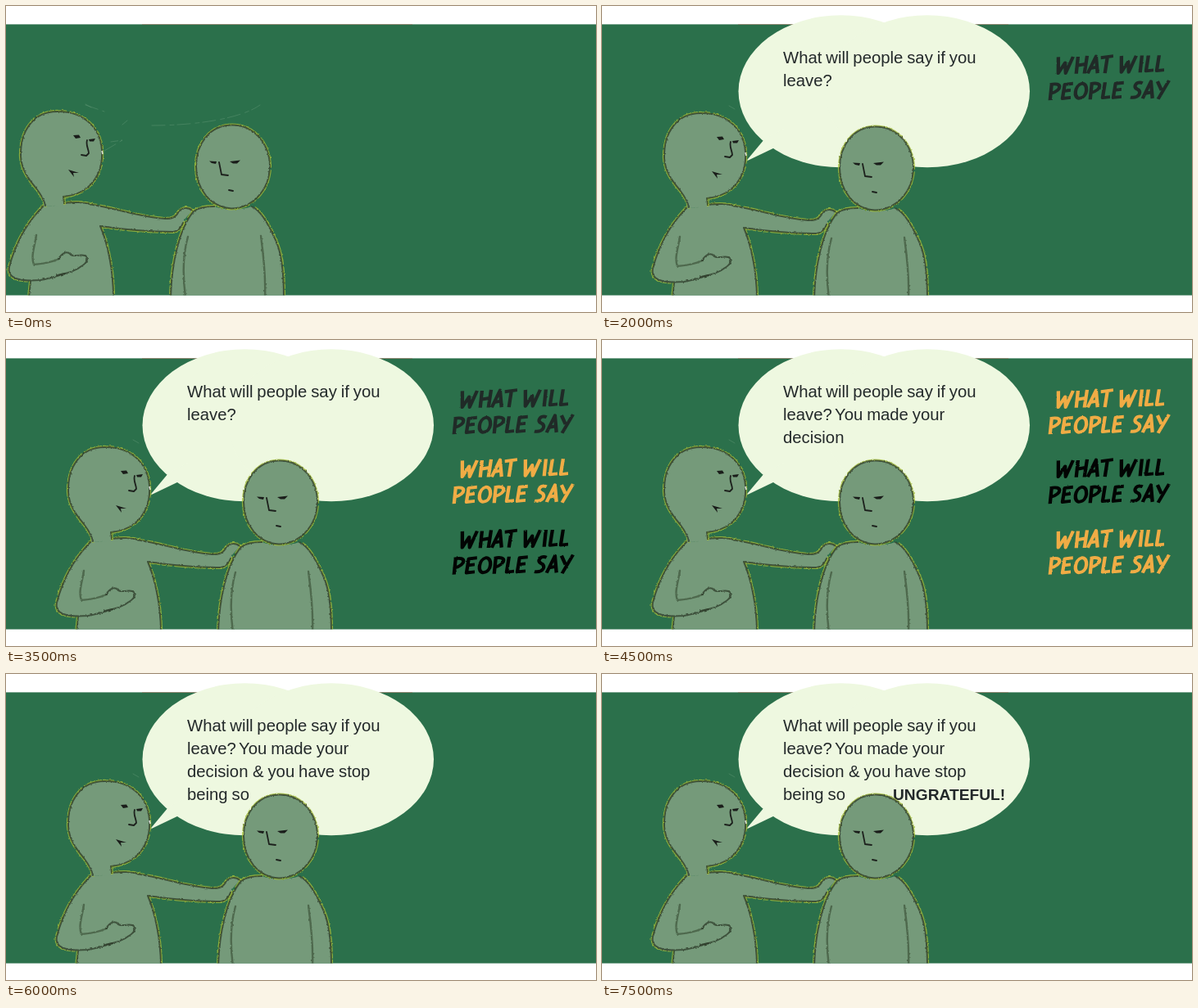
An HTML page for the animation above (8000 ms loop, 720 by 374 pixels).

```html
<!DOCTYPE html>
<html lang="en">
<head>
<meta charset="utf-8">
<title>What will people say</title>
<style>
  html, body { margin: 0; width: 100%; height: 100%; overflow: hidden; background: #fff; }
  svg { display: block; width: 720px; height: 374px; }
  .speech { font: 20.3px "Liberation Sans", Arial, sans-serif; word-spacing: -.7px; fill: #23292a; }
  .loud { font-size: 19.2px; font-weight: bold; }
  .skin { fill: #759a7a; }
  .ink, .glow, .soft, .scratch, .brush { fill: none; stroke-linecap: round; stroke-linejoin: round; }
  .glow { stroke: #a3bd3c; stroke-width: 4.2; stroke-dasharray: 9 2 4 3 14 1 3 5; opacity: .8; }
  .ink { stroke: #2d3a29; stroke-width: 2; opacity: .75; }
  .soft { stroke: #42583f; stroke-width: 2.4; opacity: .75; }
  .face { fill: none; stroke: #1d211d; stroke-width: 1.8; stroke-linecap: round; stroke-linejoin: round; }
  .lid { fill: #1a1d1a; }
  .scratch { stroke: #5c9472; stroke-width: .7; stroke-dasharray: 16 6 5 4; opacity: .75; }
  .brush { stroke-width: 4.3; stroke-linecap: butt; }
</style>
</head>
<body>
<svg viewBox="0 0 720 374">
  <defs>
    <filter id="rough" filterUnits="userSpaceOnUse" x="-20" y="0" width="760" height="374" color-interpolation-filters="sRGB">
      <feTurbulence type="fractalNoise" baseFrequency=".35" numOctaves="2" seed="4"/>
      <feDisplacementMap in="SourceGraphic" scale="2.6" xChannelSelector="R" yChannelSelector="G"/>
    </filter>
    <filter id="dry" filterUnits="userSpaceOnUse" x="500" y="30" width="220" height="280" color-interpolation-filters="sRGB">
      <feTurbulence type="fractalNoise" baseFrequency=".25" numOctaves="2" seed="9"/>
      <feDisplacementMap in="SourceGraphic" scale="1.8" xChannelSelector="R" yChannelSelector="G"/>
    </filter>
    <clipPath id="band"><rect width="720" height="353.6"/></clipPath>
  </defs>

  <rect y="22.4" width="720" height="331.2" fill="#2b704b"/>
  <path d="M166 22.6H496" stroke="#a8563f" stroke-width=".7" opacity=".6"/>

  <g id="bubble" fill="#eef8e0">
    <ellipse cx="291.500" cy="104.300" rx="125" ry="93"/>
    <ellipse cx="397" cy="104.300" rx="125" ry="93"/>
    <path d="M198 163L175.500 190L211 173L222 150Z"/>
  </g>
  <g id="speech"></g>

  <g clip-path="url(#band)">
    <g id="people">
      <path class="scratch" d="M155 122L162 126"/>
      <g id="scratches">
        <path class="scratch" d="M155 123L178 131M206 142L200 147M236 148C288 148 344 140 368 123M178 179L200 166L186 168"/>
      </g>
      <g id="figures"></g>
      <g filter="url(#rough)">
        <path class="soft" d="M95 282C93 296 88 308 92 318C104 317 114 315 123 311M280 284C273 308 274 335 277 358M369 283C372 305 375 335 374 358"/>
        <path class="ink" d="M122 311C127 303 133 301 137 306C143 309 149 305 154 307C160 309 157 316 150 320C143 326 132 329 120 331"/>
      </g>
      <path class="lid" d="M140 160L147 159.500L149 163L143 164ZM159 165L167 164L165 167.500L160 167.500ZM306 191.500L315 192L314 195L309 194ZM331 192L344 190.500L340 194.500L335 194.500ZM134 202L147 206L140 206L141 211Z"/>
      <path class="face" d="M157 166C155 172 159 177 159 182L156 185L150 184M318 193L321 208L329 209"/>
      <path class="face" stroke-linecap="butt" d="M330 227L335 228"/>
      <path d="M175 179L176 183" stroke="#dfe6dc" stroke-width="1.500"/>
    </g>
  </g>
  <g id="titles" filter="url(#dry)"></g>
</svg>

<script>
const STEP = 500, STEPS = 16;
const $ = id => document.getElementById(id);

function add(parent, tag, attrs = {}) {
  const el = document.createElementNS("http://www.w3.org/2000/svg", tag);
  for (const key in attrs) el.setAttribute(key, attrs[key]);
  return parent.appendChild(el);
}

// Closed shapes; the lower edges run past the band and are clipped.
const shapes = {
  leftBody: "M104 246C88 262 71 286 62 321C59 335 74 339 88 338L86 358H189" +
    "C189 325 182 292 173 271C200 275 232 278 262 278C268 277 272 273 274 267" +
    "C275 262 281 258 285 252C281 248 273 248 269 253C265 261 260 262 252 262" +
    "C222 260 190 249 164 245C152 241 140 242 129 243C120 247 112 247 104 246Z",
  leftHead: "M104 247C105 240 101 233 95 225C85 213 77 202 76 186C75 153 93 130 122 131" +
    "C153 131 173 151 175 178C177 207 161 232 128 235L128 246Z",
  rightBody: "M312 247C300 247 292 249 287 253C269 274 260 318 259 358H397" +
    "C397 328 395 303 386 286C378 268 369 252 358 247C344 252 326 252 312 247Z",
  rightHead: "M333 147.500C360 147 380 170 380 199C379 228 358 249 333 249.500" +
    "C307 248 290 225 290 198C290 170 307 148 333 147.500Z"
};
// Drawn edges, left open where the neck and arms join.
const outlines = {
  leftBody: "M104 246C88 262 71 286 62 321C59 335 74 339 100 337C112 335 120 332 130 329" +
    "M88 339L86 358M189 358C189 325 182 292 173 271C200 275 232 278 262 278" +
    "C268 277 272 273 274 267M285 252C281 248 273 248 269 253C265 261 260 262 252 262" +
    "C222 260 190 249 164 245C152 241 140 242 129 243",
  leftHead: "M106 246C105 240 101 233 95 225C85 213 77 202 76 186C75 153 93 130 122 131" +
    "C153 131 173 151 175 178C177 207 161 232 128 235L129 243",
  rightBody: "M312 247C300 247 292 249 287 253C269 274 260 318 259 358" +
    "M397 358C397 328 395 303 386 286C378 268 369 252 358 247",
  rightHead: shapes.rightHead
};
for (const name in shapes) {
  const rough = add($("figures"), "g", { filter: "url(#rough)" });
  add(rough, "path", { class: "glow", d: outlines[name] });
  add(rough, "path", { class: "skin", d: shapes[name] });
  add(rough, "path", { class: "ink", d: outlines[name] });
}

// Text, x, baseline, first step, extra class.
const phrases = [
  ["What will people say if you", 221, 70, 2],
  ["leave?", 221, 98, 3],
  ["You made your", 284, 98, 8],
  ["decision", 221, 126, 9],
  ["& you have", 301, 126, 10],
  ["stop", 406, 126, 11],
  ["being so", 221, 154, 12],
  ["UNGRATEFUL!", 355, 154, 13, "loud"]
].map(([words, x, y, from, extra = ""]) => {
  const el = add($("speech"), "text", { x, y, class: "speech " + extra });
  el.textContent = words;
  return { el, from };
});

// Brush capitals, 24 high: advance and strokes.
const glyphs = {
  W: [24, "M2 1L4 23L11 9L13 23L20 1"],
  H: [16, "M2 1L2 24M13 0L12 24M2 13L13 11"],
  A: [14, "M0 24L8 1L12 24M3 17L12 15"],
  T: [15, "M0 3L15 1M8 2L7 24"],
  I: [8, "M3 1L3 24"],
  L: [13, "M3 1L2 22L11 21"],
  P: [16, "M3 1L3 24M1 3C16 -1 17 11 3 15"],
  E: [15, "M13 2L3 3L2 22L12 21M2 12L11 11"],
  O: [18, "M9 2C0 4 0 23 8 22C18 21 17 2 9 2Z"],
  S: [15, "M13 3C5 0 1 8 7 11C14 14 11 24 0 22"],
  Y: [15, "M2 1L8 13M16 0L5 25"],
  " ": [8, ""]
};

function letter(parent, words, x, y) {
  const line = add(parent, "g", {
    class: "brush", role: "img", "aria-label": words,
    transform: `translate(${x} ${y}) rotate(-1) skewX(-7) scale(1 .9)`
  });
  let pen = 0;
  for (const char of words) {
    const [advance, d] = glyphs[char];
    add(line, "path", { d, transform: `translate(${pen} 0)` });
    pen += advance;
  }
  return line;
}

const titles = [0, 85, 171.5].map(dy => {
  const el = add($("titles"), "g");
  letter(el, "WHAT WILL", 555, 61.5 + dy);
  const second = letter(el, "PEOPLE SAY", 546, 93.5 + dy);
  return { el, second };
});

const paint = { d: "#202a27", o: "#f0ac45", k: "#020403" };
// Colours of the three titles, by step.
const looks = ["", "", "", "d", "d", "do", "doo", "dok", "oko", "oko"];

function show(el, on) {
  el.style.display = on ? "" : "none";
}

function draw(step) {
  $("people").setAttribute("transform", step ? "" : "translate(-58 -2)");
  show($("scratches"), step === 0);
  show($("bubble"), step > 0);
  phrases.forEach(({ el, from }) => show(el, step >= from));
  const look = looks[step] || "";
  titles.forEach(({ el, second }, i) => {
    show(el, i < look.length);
    show(second, step > 3);
    el.setAttribute("stroke", paint[look[i]] || "none");
  });
}

const start = performance.now();
let last = -1;
function tick() {
  const step = Math.floor((performance.now() - start) / STEP) % STEPS;
  if (step !== last) draw(last = step);
  requestAnimationFrame(tick);
}
tick();
</script>
</body>
</html>
```
